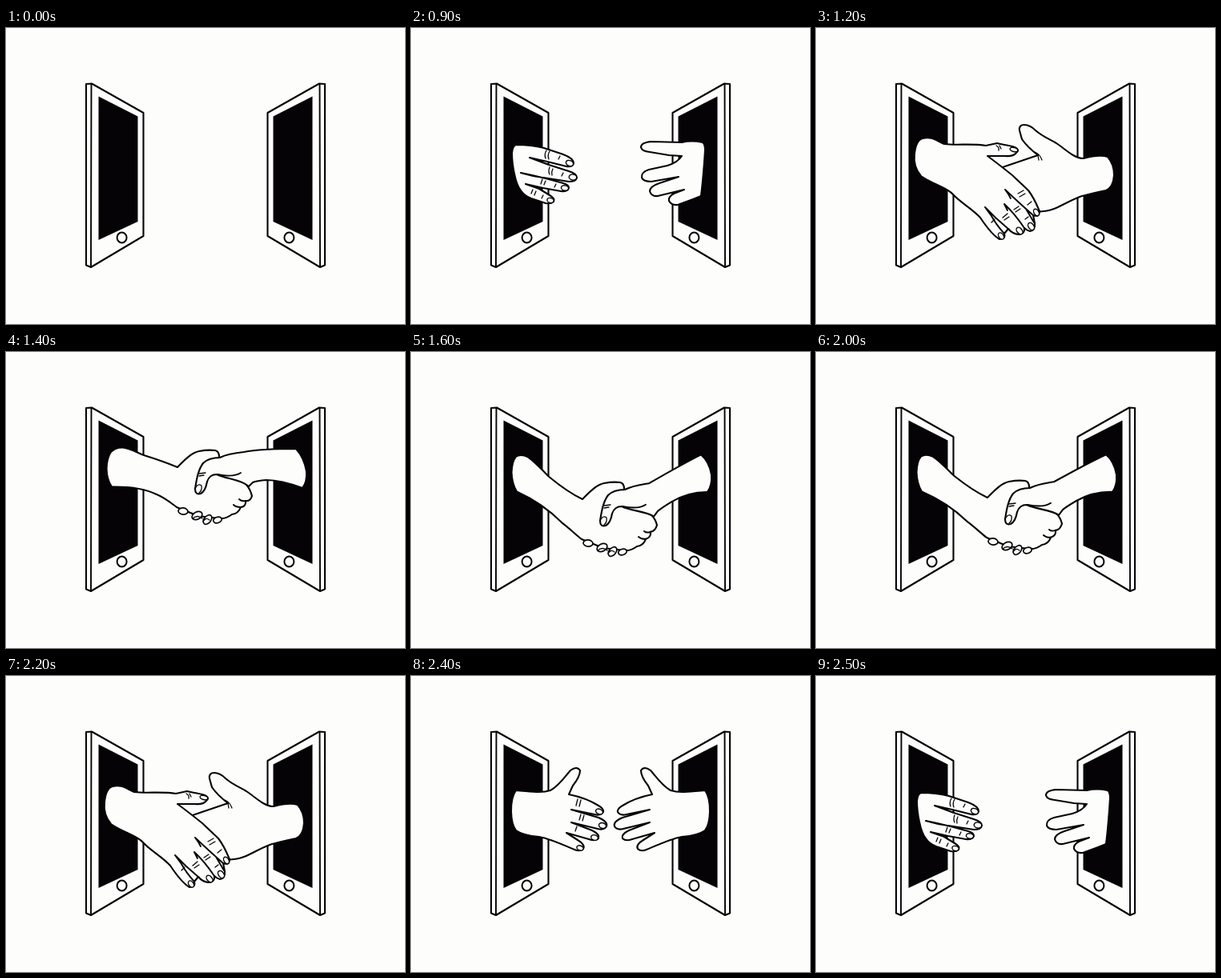
An HTML page with a canvas for the animation above (2.6 s loop, 498 px wide and 370 px high).

```html
<!DOCTYPE html>
<html lang="en">
<head>
<meta charset="utf-8">
<title>Handshake</title>
<style>
  html, body { margin: 0; width: 100%; height: 100%; overflow: hidden; background: #fdfefc; }
  canvas { display: block; }
</style>
</head>
<body>
<canvas width="498" height="370"></canvas>
<script>
const ctx = document.querySelector('canvas').getContext('2d');
const PAPER = '#fdfefc', INK = '#050306';
const LOOP = 2600;

// Vertical bend of the arms: the clasp moves by `sway`, the wrists hardly at all.
let sway = 0, lift = 0;
function bend(x, y) {
  const reach = Math.min(1, Math.max(0, (130 - Math.abs(x - 249)) / 90));
  return y + lift + sway * reach * reach * (3 - 2 * reach);
}

const path = d => new Path2D(d.replace(/([\d.]+),([\d.]+)/g, (_, x, y) => `${x},${bend(+x, +y)}`));

function paint(p, width, fill) {
  if (fill) {
    ctx.fillStyle = fill;
    ctx.fill(p);
  }
  ctx.lineWidth = width;
  ctx.stroke(p);
}

const shape = d => paint(path(d), 2.1, PAPER);
const line = d => paint(path(d), 1.9);
const fine = d => paint(path(d), 1.3);

function oval(x, y, rx, ry, angle = 0, width = 1.4) {
  const p = new Path2D();
  p.ellipse(x, bend(x, y), rx, ry, angle, 0, 2 * Math.PI);
  paint(p, width, PAPER);
}

function mirrored(draw) {
  ctx.save();
  ctx.translate(498, 0);
  ctx.scale(-1, 1);
  draw();
  ctx.restore();
}

function phone() {
  shape('M100,70 L107,69.5 L171.5,106 V260 L106,299 L100,296.5 Z');
  line('M106.5,70 L106,298');
  ctx.fillStyle = INK;
  ctx.fill(path('M115.5,85.5 L164.5,110.5 V242 L115.5,265 Z'));
  oval(144.6, 262, 6, 6.4, 0, 2);
}

function emerging() {
  shape('M131,146 Q150,146 166,150 L190,158 Q203,163 203,169 Q202,174 194,173 L170,167 L148,162 L172,171 L197,179 Q207,182 207,187 Q206,192 197,192 L165,187 Q150,185 137,181 Q152,184 168,188 L190,194 Q197,196 197,200 Q195,205 187,204 L165,200 L143,195 L160,201 L173,209 Q180,213 178,217 Q175,220 168,219 L150,213 Q142,210 137,203 C130,195 126,170 126,156 Q127,147 131,146 Z');
  oval(198, 169, 4.8, 3.4, .4);
  oval(202, 186.5, 4.8, 3.6, .2);
  oval(192, 200, 4.6, 3.2, .2);
  oval(174, 215.5, 4.2, 3, .3);
  fine('M169,153 Q166,158 168,163 M173,154 Q170,159 172,164 M186,160 L184,164 M173,174 Q171,179 173,183 M177,176 Q175,180 176,184 M190,181 L188,185 M164,189 L162,195 M168,191 L166,196 M181,195 L179,199 M152,202 L150,207 M156,204 L154,209 M165,209 L163,213');

  shape('M364,143 Q350,140 338,143 L300,142 Q287,143 287,149 Q288,154 298,155 L322,159 L338,160 Q333,168 320,172 L297,177 Q287,180 288,187 Q290,192 300,192 L334,186 L310,194 Q298,198 298,204 Q300,211 308,210 L341,202 L328,207 Q321,211 322,216 Q325,222 333,221 L352,214 L362,210 Q365,185 367,153 Q367,145 364,143 Z');
}

function openHand() {
  shape('M131,143 C148,144 162,147 174,143 C184,138 192,126 199,118 Q207,112 211,118 Q211,126 202,137 L197,148 C212,151 226,157 234,162 Q241,166 240,170 Q237,175 229,173 L200,167 L234,177 Q246,182 244,188 Q241,193 233,191 L200,183 L226,193 Q236,198 234,203 Q230,207 222,204 L194,196 L208,205 Q218,211 215,216 Q211,220 204,217 C190,211 172,203 160,201 C148,200 138,198 131,193 C124,184 122,156 131,143 Z');
}

function reaching() {
  mirrored(openHand);
  openHand();
  oval(235, 169.5, 4.6, 3.2, .4);
  oval(239, 187, 4.6, 3.4, .3);
  oval(229, 202, 4.4, 3.2, .3);
  oval(211, 215, 4.2, 3, .4);
  fine('M208,154 L206,162 M212,155 L210,163 M212,173 L210,180 M216,174 L214,181 M207,188 L205,194');
}

function touching() {
  shape('M230,175 L277,159 Q264,149 257,139 L254,128 Q253,121 260,121 Q267,121 274,128 C283,136 292,139 300,144 C312,152 322,163 334,163 C345,160 355,158 364,161 Q372,170 372,184 Q371,199 362,203 C350,205 340,208 332,210 C320,214 305,223 297,226 C290,229 283,229 277,230 L245,215 Z');
  fine('M273,155 Q279,157 282,165 M277,159 L278,165');

  shape('M133,138 C145,135 150,141 160,145 C175,147 195,144 212,147 L226,144 C238,147 246,147 250,150 Q254,153 250,156 Q246,161 236,160 L214,160 C225,168 235,176 245,184 L265,203 C272,212 276,222 279,229 Q279,237 271,234 L273,244 Q274,253 267,254 Q263,253 260,250 Q261,258 252,258 Q245,257 240,251 L235,257 Q237,264 229,264 C222,260 213,249 205,237 C195,226 180,218 171,208 C165,200 145,195 131,185 Q121,173 123,157 Q125,140 133,138 Z');
  line('M271,234 Q255,220 236,202 Q240,207 243,213 M272,243 L262,226 M260,250 Q248,232 235,220 L239,228 M241,252 L224,237 L211,224 M235,257 Q225,246 219,235 L211,224');
  oval(275, 230.5, 3, 4.6, -.5);
  oval(268.5, 248, 3.3, 5, -.6);
  oval(254, 253.5, 3.2, 4.8, -.7);
  oval(231, 260, 3, 4.5, -.6);
  oval(247, 152, 5, 2.6, .25);
  fine('M225,147 Q229,149 228,153 M229,147 L231,151 M252,207 L259,203 M254,211 L261,207 M247,227 L253,223 M249,230 L255,226 M233,237 L239,232 M235,240 L241,236 M219,243 L223,239 M264,221 L269,217 M261,239 L265,236');
}

function clasp() {
  shape('M131,125 Q137,119 146,119.5 C156,121 164,126 172,129 C188,134 202,139 214,144 C222,136 231,126 241,124 Q252,122 261,123 Q266,124 266,131 L285,155 Q303,163 307,180 Q305,187 299,186 Q300,193 293,194 Q290,202 282,203 Q274,209 266,208 L240,205 L213,194 C205,188 198,182 188,178 C174,171 158,168 132,168.5 Q126,160 125.5,146 Q126,132 131,125 Z');
  shape('M267,132 C277,127 287,126 297,125 C317,121 342,121 362,121 Q372,132 375,149 Q376,163 370,170 C354,164 339,160 325,160 Q313,161 308,163 L303,168 C293,159 275,159 263,153 Q254,153 251,162 Q249,174 243,177 Q236,179 236,171 C238,158 240,147 246,139 Q253,132 267,132 Z');
  line('M264,153 Q284,157 293,151 M299,186 Q294,187 291,184 M293,194 Q287,194 284,191');
  fine('M241,152 L249,151 M241,155 L247,154 M237,169 Q240,164 244,167 Q245,173 241,176');
  oval(221, 199, 6, 4.1, .1, 1.7);
  oval(238.5, 204.5, 6.8, 4.6, -.5, 1.7);
  oval(251.5, 209.5, 4.3, 6.6, .7, 1.7);
  oval(264, 210, 5.4, 3.6, -.3, 1.7);
  fine('M233,208 Q239,203 245,208 M246,212 Q249,206 254,210');
}

function shake(newSway, newLift) {
  return () => {
    sway = newSway;
    lift = newLift;
    clasp();
    sway = lift = 0;
  };
}

// Each pose holds until the next start time.
const poses = [
  [0, () => {}],
  [900, emerging],
  [1100, reaching],
  [1200, touching],
  [1300, shake(14, 0)],
  [1400, shake(0, 0)],
  [1600, shake(36, 4)],
  [1800, shake(0, 4.5)],
  [2000, shake(34, 4)],
  [2200, touching],
  [2400, reaching],
  [2500, emerging]
];

function frame() {
  const time = performance.now() % LOOP;
  ctx.fillStyle = PAPER;
  ctx.fillRect(0, 0, 498, 370);
  ctx.strokeStyle = INK;
  ctx.lineCap = ctx.lineJoin = 'round';
  phone();
  mirrored(phone);
  poses.findLast(([start]) => start <= time)[1]();
  requestAnimationFrame(frame);
}
frame();
</script>
</body>
</html>
```
